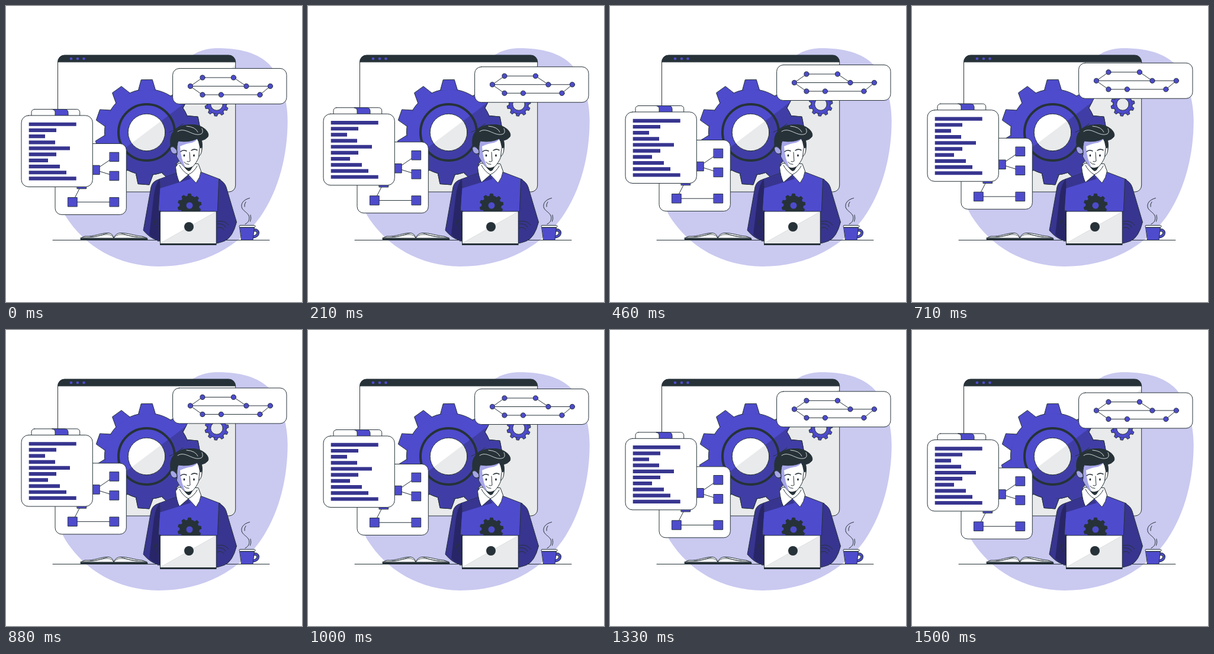
These frames come from a looping animation (500 px wide and 500 px high, 1.54 s). An HTML page without scripts:

```html
<!DOCTYPE html>
<html lang="en">
<head>
<meta charset="utf-8">
<title>Developer at work</title>
<style>
  :root { --ink: #263238; --violet: #4e4bcd; --deep: #37358f; --shade: #e9eaeb; }
  html, body { margin: 0; width: 100%; height: 100%; overflow: hidden; background: #fff; }
  svg { display: block; width: 100%; height: 100%; }
  .line { fill: none; }
  .ink { fill: var(--ink); }
  .violet { fill: var(--violet); }
  .deep { fill: var(--deep); }
  .shade { fill: var(--shade); }
  .white { fill: #fff; }
  .flat { stroke: none; }
</style>
</head>
<body>
<svg viewBox="0 0 500 500" stroke="#263238" stroke-width="1" stroke-linejoin="round" stroke-linecap="round">
  <defs>
    <path id="tooth" d="M-14.5-71 L-9.5-88.5 H9.5 L14.5-71" vector-effect="non-scaling-stroke"/>
    <g id="gear">
      <circle r="72.5" vector-effect="non-scaling-stroke"/>
      <use href="#tooth"/>
      <use href="#tooth" transform="rotate(-35)"/>
      <use href="#tooth" transform="rotate(-70)"/>
      <use href="#tooth" transform="rotate(-105)"/>
      <use href="#tooth" transform="rotate(-140)"/>
      <use href="#tooth" transform="rotate(-175)"/>
      <use href="#tooth" transform="rotate(-210)"/>
      <use href="#tooth" transform="rotate(-245)"/>
      <use href="#tooth" transform="rotate(-280)"/>
      <use href="#tooth" transform="rotate(-315)"/>
    </g>
    <circle id="dot" r="4.1"/>
    <rect id="box" x="-7.7" y="-7.7" width="15.4" height="15.4"/>
    <path id="shadow" d="M387.700 99.500 V303 A11 11 0 0 1 376.700 314 H103 Z"/>
    <clipPath id="shadowClip"><use href="#shadow"/></clipPath>
  </defs>

  <!-- Backdrop -->
  <path class="flat" fill="#cac9f0" d="M312 85 C332 71 350 71 368 71.500 C407 73 436 85 451 106 C466 128 476 160 475.700 195 C475.500 250 462 310 429 357 C394 405 335 440 257 440 C190 439 134 408 100 354 C84 325 80 300 88 280 L180 150 Z"/>
  <path class="line" d="M79 395.500 H445"/>

  <!-- Browser window -->
  <rect class="white flat" x="87.500" y="83" width="300.200" height="231" rx="11"/>
  <use href="#shadow" class="shade flat"/>
  <path class="ink" d="M87.500 94.300 A11.300 11.300 0 0 1 98.800 83 H376.400 A11.300 11.300 0 0 1 387.700 94.300 Z"/>
  <g class="violet flat">
    <circle cx="110" cy="89" r="2.300"/>
    <circle cx="121" cy="89" r="2.300"/>
    <circle cx="131.500" cy="89" r="2.300"/>
  </g>
  <path class="line" d="M387.700 94 V303 A11 11 0 0 1 376.700 314 H87.500 V94"/>

  <use href="#gear" class="violet" transform="translate(239 213) rotate(-.8)"/>
  <g clip-path="url(#shadowClip)">
    <use href="#gear" fill="#403ea6" transform="translate(239 213) rotate(-.8)"/>
  </g>
  <circle class="line" cx="237.500" cy="213.500" r="47.500" stroke-width="4"/>
  <circle class="white" cx="237.500" cy="213.500" r="31.300"/>
  <circle class="shade" cx="237.500" cy="213.500" r="31.300" clip-path="url(#shadowClip)"/>

  <use href="#gear" class="violet" transform="translate(356 166) scale(.226)"/>
  <circle class="shade" cx="356" cy="166" r="10.300"/>

  <!-- Floating cards -->
  <g>
    <animateTransform attributeName="transform" type="translate" values="0 0; 0 -10; 0 0" dur="1.54s" begin="-0.04s" repeatCount="indefinite"/>

    <rect class="white" x="281.600" y="106" width="192.400" height="60" rx="11"/>
    <path class="line" d="M311.500 136 L332 121.500 H384.500 L406 136 M311.500 136 H446.500 L429 150.500 H332 Z"/>
    <g class="violet">
      <use href="#dot" x="311.500" y="136"/>
      <use href="#dot" x="332" y="121.500"/>
      <use href="#dot" x="384.500" y="121.500"/>
      <use href="#dot" x="406" y="136"/>
      <use href="#dot" x="446.500" y="136"/>
      <use href="#dot" x="332" y="150.500"/>
      <use href="#dot" x="363.500" y="150.500"/>
      <use href="#dot" x="429" y="150.500"/>
    </g>

    <rect class="white" x="83" y="233" width="120.300" height="120" rx="11"/>
    <path class="line" d="M183 255.500 L150.500 277.500 L183 287.500 M128 301.500 L112.500 331.700 H183"/>
    <g class="violet">
      <use href="#box" x="183" y="255.500"/>
      <use href="#box" x="150.500" y="277.500"/>
      <use href="#box" x="183" y="287.500"/>
      <use href="#box" x="128" y="301.500"/>
      <use href="#box" x="112.500" y="331.700"/>
      <use href="#box" x="183" y="331.700"/>
    </g>

    <rect class="white" x="43" y="175" width="81.700" height="20" rx="5"/>
    <path class="violet" d="M78 175 H99 Q105 175 105 181 V188 H83 V180 Q83 176 78 175 Z"/>
    <rect class="white" x="26" y="185.500" width="120.300" height="120.500" rx="12"/>
    <path class="line" style="stroke: var(--deep)" stroke-width="6.200" stroke-linecap="butt" d="M38.700 200.300 H118.700 M38.700 210.500 H85 M38.700 220.700 H66 M38.700 230.900 H83 M38.700 241 H108 M38.700 251.200 H85 M38.700 261.400 H71 M38.700 271.600 H91 M38.700 281.800 H102 M38.700 292 H118.700"/>
  </g>

  <!-- Book -->
  <path class="white" d="M126 392 L133 389 C150 390 160 383 173 383.500 Q180 384 182 392 Q185 384 193 383.500 C206 383 216 388 230 389 L238 392 Z"/>
  <path class="line" d="M129 391 C150 392 160 386 171 386 Q179 386 182 392 Q186 386 194 386 C207 386 215 391 235 391 M142 390 C157 390 164 385 173 383.500 M222 390 C208 390 201 385 193 383.500" stroke-width=".8"/>
  <path class="line" d="M127 393.700 H238" stroke-width="3"/>

  <!-- Mug -->
  <path class="line" d="M418 379 C428 376 429 390 416 390" stroke-width="5"/>
  <path class="line" d="M418 379 C428 376 429 390 416 390" style="stroke: var(--violet)" stroke-width="3"/>
  <path class="violet" d="M395 374 H419.500 L417 395.500 H398 Z"/>
  <rect class="white" x="394" y="370.500" width="27" height="3.300" rx="1.500"/>
  <path class="line" d="M411.500 324.500 C401 327 396 334 398.500 341 C401 347 411 350 411 358 Q411 365 404 368.500 M413 353 Q415 359 412.500 364 M405 331 Q402 335 403 339"/>

  <!-- Sweater -->
  <path class="violet" d="M288 282 L259 292.500 L256 397 H360 L362 293 L328 280 Z"/>
  <path class="deep flat" d="M288 282 L259 292.500 L260 308 L312 292 L300 276 Z"/>
  <path class="deep" d="M259 292.500 Q247 296 245 306 L232 379 Q243 392 254 395 L261 397 V346 L257 346 L260 306 Z"/>
  <path class="flat" fill="#282668" d="M259 293 Q253 300 250 318 L242 386 Q248 393 254 395 L260.500 396 V346 H257 L260 306 Z"/>
  <path class="deep" d="M360 293 Q369 297 372 306 L389.500 365 Q383 391 369 397 Q361 400 355 401 V347 H357 Z"/>
  <path class="line" d="M250 362 Q250 372 260 379 M253 360 Q255 368 260 371 M357 364 Q369 361 376 370 M357 368 Q368 367 371 374 M357 375 Q364 372 368 378"/>

  <use href="#gear" class="ink" transform="translate(310 337) scale(.224)"/>
  <circle class="violet flat" cx="310" cy="337" r="5.500"/>

  <!-- Head -->
  <path class="white" d="M291 266 L286.500 272 Q288 288 293 298 L308 285 L321 299 Q328 290 329.500 279 L325 267 Z"/>
  <path class="line" d="M293 269 Q298 279 308 285 Q318 280 323 270"/>
  <path class="white" d="M287 225 L288.500 254 Q296 269 305 275 Q309 278 313 274 Q323 264 326 254 L331 225 Q308 212 287 225 Z"/>
  <path class="flat" fill="#a6a5e6" d="M288 220 L289 254 Q295 267 304 274 Q295 258 294 237 Q305 232 314 231 Q323 228 324 222 Z"/>
  <path class="ink flat" d="M301 271.500 Q308 275 315 271 Q313 278 308.500 279 Q304 277 301 271.500 Z"/>
  <path class="ink" d="M278.500 239 Q275.500 220 283 212 Q292 201 309 200.500 Q326 199 337 208.500 Q344 216 341 221 Q337 226 330.500 227 Q333 238 329 249 L327 236 Q326 229 323 224 Q310 231 291 228 Q288 234 289 251 L285 238 Q282 237 280 241 Z"/>
  <path class="line" d="M276 213 Q284 210 299 199 M283 212 Q294 204 306 203"/>
  <path class="line" stroke="#fff" stroke-width=".8" d="M290 212 C303 203 316 222 330 216 Q334 213 331 207 M305 203 Q320 204 324 213"/>
  <path fill="#a6a5e6" d="M288 243 Q281 234 277.500 240 Q278 249 285 250 L289 248 Z"/>
  <path class="white" d="M327 241 Q332 235 330.500 246 Q329 252 326 254 Z"/>
  <path class="line" stroke-width="1.500" d="M295 246 Q299 242 305 245 M313 244 Q318 240.500 323 243.500"/>
  <path class="line" d="M310 247 L311 262 Q309 264 306 262.500 M300.500 263.500 Q304 268 309 267.500"/>
  <g class="ink flat">
    <ellipse cx="301" cy="252.500" rx="1.400" ry="2"/>
    <ellipse cx="317.500" cy="252.500" rx="1.400" ry="2"/>
  </g>

  <!-- Laptop -->
  <rect class="white" x="260.500" y="347" width="94.500" height="55" rx="1"/>
  <path class="shade flat" d="M261 401 L354.500 348 V401 Z"/>
  <path class="line" style="stroke: #c3c6c8" stroke-width=".6" d="M262 400 L354 348"/>
  <circle class="ink flat" cx="309" cy="373" r="8"/>
  <path class="line" stroke-width="3" stroke-linecap="butt" d="M260 402.500 H355.500"/>
</svg>
</body>
</html>
```
